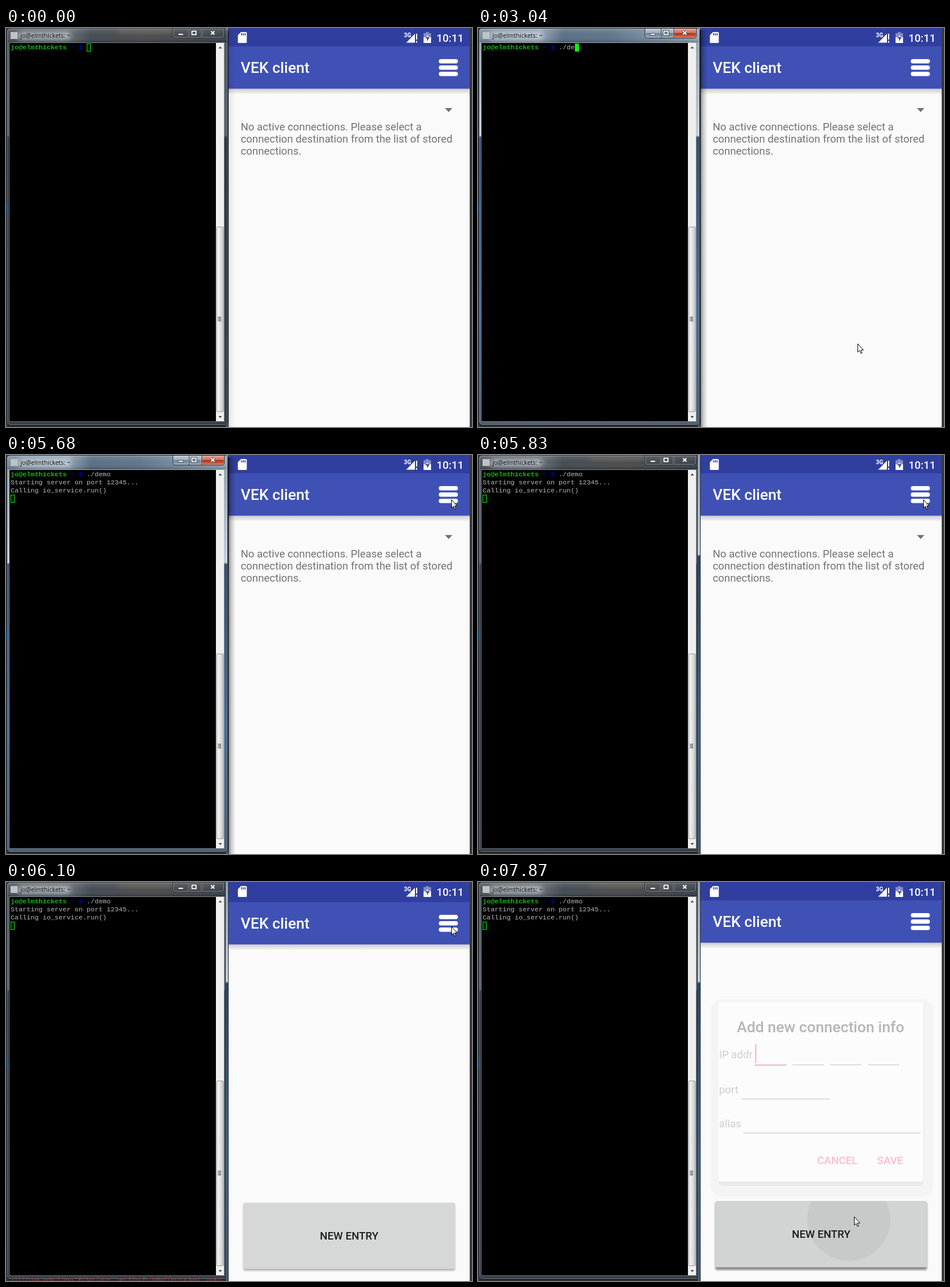
Write an HTML page that moves like this. It is 808x693 px and loops after 7.99 s.

```html
<!DOCTYPE html>
<html lang="en">
<head>
<meta charset="utf-8">
<title>Terminal and phone</title>
<style>
html, body { margin: 0; width: 100%; height: 100%; overflow: hidden; background: #2b2c2e; }
svg { display: block; }
text { white-space: pre; }
.ui { font: 18.35px Roboto, sans-serif; }
.med { font-weight: 500; font-size: 18.5px; }
.head { font-size: 26.2px; }
.mono { font: 11.57px "Liberation Mono", monospace; }
</style>
</head>
<body>
<svg id="stage" width="808" height="693" viewBox="0 0 808 693">
<defs>
  <linearGradient id="idleTitle">
    <stop offset="0" stop-color="#4a5158"/><stop offset=".3" stop-color="#5b6268"/>
    <stop offset=".38" stop-color="#3f474f"/><stop offset=".65" stop-color="#47484a"/>
    <stop offset="1" stop-color="#384048"/>
  </linearGradient>
  <linearGradient id="liveTitle">
    <stop offset="0" stop-color="#75889c"/><stop offset=".28" stop-color="#8fa0b2"/>
    <stop offset=".38" stop-color="#566b81"/><stop offset=".6" stop-color="#5d7288"/>
    <stop offset="1" stop-color="#94a6b8"/>
  </linearGradient>
  <linearGradient id="gloss" x2="0" y2="1">
    <stop offset="0" stop-color="#fff" stop-opacity=".16"/><stop offset=".5" stop-color="#fff" stop-opacity=".03"/>
    <stop offset="1" stop-color="#000" stop-opacity=".2"/>
  </linearGradient>
  <linearGradient id="liveSide" x2="0" y2="1">
    <stop offset="0" stop-color="#8e9dac"/><stop offset=".27" stop-color="#c9d3dc"/>
    <stop offset=".275" stop-color="#2c4764"/><stop offset=".7" stop-color="#42668c"/>
    <stop offset="1" stop-color="#465a6c"/>
  </linearGradient>
  <linearGradient id="idleSide" x2="0" y2="1">
    <stop offset="0" stop-color="#4c545c"/><stop offset=".27" stop-color="#525b64"/>
    <stop offset=".275" stop-color="#252d36"/><stop offset="1" stop-color="#30383f"/>
  </linearGradient>
  <linearGradient id="silver" x2="0" y2="1">
    <stop offset="0" stop-color="#c4cfda"/><stop offset=".5" stop-color="#98a8b9"/>
    <stop offset=".52" stop-color="#6c7f94"/><stop offset="1" stop-color="#93a8bd"/>
  </linearGradient>
  <linearGradient id="red" x2="0" y2="1">
    <stop offset="0" stop-color="#e5aaa0"/><stop offset=".48" stop-color="#cc6a58"/>
    <stop offset=".52" stop-color="#b02a16"/><stop offset="1" stop-color="#d97a52"/>
  </linearGradient>
  <linearGradient id="thumb">
    <stop offset="0" stop-color="#f6f6f6"/><stop offset=".5" stop-color="#e3e3e4"/>
    <stop offset="1" stop-color="#c2c3c6"/>
  </linearGradient>
  <linearGradient id="cast">
    <stop offset="0" stop-color="#000" stop-opacity=".55"/><stop offset=".4" stop-color="#000" stop-opacity=".2"/>
    <stop offset="1" stop-color="#000" stop-opacity="0"/>
  </linearGradient>
  <linearGradient id="drop" x2="0" y2="1">
    <stop offset="0" stop-color="#000" stop-opacity=".18"/><stop offset="1" stop-color="#000" stop-opacity=".04"/>
  </linearGradient>
  <filter id="blur" x="-20%" y="-80%" width="140%" height="260%"><feGaussianBlur stdDeviation="4"/></filter>
  <filter id="soft" x="-5%" y="-10%" width="110%" height="125%"><feGaussianBlur stdDeviation="1.5"/></filter>
  <clipPath id="btnClip"><rect x="412" y="554" width="366" height="115" rx="2"/></clipPath>
  <g id="bar">
    <rect x="386" width="418" height="32" fill="#303f9f"/>
    <rect x="386" y="32" width="418" height="73.500" fill="#3f51b5"/>
    <rect x="386" y="105.500" width="418" height="8.500" fill="url(#drop)"/>
    <text class="ui med head" x="407" y="78" fill="#fff">VEK client</text>
    <g fill="#fff">
      <rect x="750.500" y="54" width="33" height="7.500" rx="3.500"/>
      <rect x="750.500" y="65" width="33" height="7.500" rx="3.500"/>
      <rect x="750.500" y="76" width="33" height="7.500" rx="3.500"/>
    </g>
  </g>
</defs>

<rect width="808" height="693" fill="#2b2c2e"/>
<rect width="2" height="693" fill="#36414c"/>
<rect y="304" width="2" height="18" fill="#0d5c94"/>
<rect x="804" width="4" height="693" fill="#37383a"/>

<g id="phone">
  <g id="phoneEdge">
    <rect x="380" y="-20" width="6" height="713" fill="url(#liveSide)"/>
    <path d="M380.5 0V693M385.5 0V693" stroke="#252c34"/>
  </g>
  <g id="home">
    <rect x="386" width="418" height="693" fill="#fafafa"/>
    <use href="#bar"/>
    <path d="M761 139h13l-6.5 7z" fill="#737373"/>
    <g class="ui" fill="#737373">
      <text x="407" y="178">No active connections. Please select a</text>
      <text x="407" y="199">connection destination from the list of stored</text>
      <text x="407" y="220">connections.</text>
    </g>
  </g>
  <g id="menu">
    <rect x="386" width="418" height="700" fill="#fafafa"/>
    <use href="#bar"/>
    <rect id="btnShade" x="411.5" y="556" width="367" height="116" rx="3" filter="url(#soft)"/>
    <rect x="412" y="554" width="366" height="115" rx="2" fill="#d6d7d7"/>
    <g id="ripple" clip-path="url(#btnClip)">
      <rect x="412" y="554" width="366" height="115" fill="#d2d4d3"/>
      <circle cx="643" cy="586" r="72" fill="#c8c9c9"/>
    </g>
    <text class="ui med" x="595" y="618" text-anchor="middle" fill="#1c1c1c">NEW ENTRY</text>
  </g>
  <g id="dialog">
    <rect x="404" y="204" width="385" height="342" rx="18" fill="#f4f4f4"/>
    <rect x="417" y="212" width="356" height="316" rx="8" fill="#eaeaea"/>
    <rect x="417" y="209" width="355" height="311" rx="3" fill="#fcfcfc"/>
    <text class="ui med head" x="594" y="261" text-anchor="middle" fill="#b6b6b6">Add new connection info</text>
    <g class="ui" fill="#cecece">
      <text x="418" y="306">IP addr</text><text x="418" y="367">port</text><text x="418" y="426">alias</text>
    </g>
    <path d="M545 317.5h55M611 317.5h54M676 317.5h54M457 376.7h153M460 436h307" stroke="#d2d2d2" stroke-width="1.5"/>
    <path d="M480 318h55M481.5 282v33" stroke="#f9b9d0" stroke-width="2.4"/>
    <g class="ui med" fill="#f9bdd2"><text x="588" y="490">CANCEL</text><text x="692" y="490">SAVE</text></g>
  </g>
  <g fill="#fff">
    <path d="M407.500 7h8.500q1.500 0 1.500 1.500v16q0 1.500 -1.500 1.500h-12.500q-1.500 0 -1.500 -1.500V12.500z"/>
    <path d="M408.500 9v4M411.500 9v4M414.500 9v4" stroke="#303f9f" stroke-width="1.600"/>
    <text x="690" y="15.500" style="font:700 10px Roboto,sans-serif">3G</text>
    <path d="M694 25.500L709 10v15.500z"/>
    <path d="M712 10v10M712 22.500v3" stroke="#fff" stroke-width="2"/>
    <path d="M728 7h5v2h4v8h-13V9h4z" opacity=".4"/>
    <path d="M724 16h13v10h-13z"/>
    <path d="M731.500 11l-4.500 7h3v5l4.500 -7h-3z" fill="#303f9f"/>
    <path d="M731.500 11l-3 5h6l.3 -.5h-3.300z"/>
    <text class="ui med" x="746.500" y="23.500">10:11</text>
  </g>
</g>

<g id="term">
  <rect id="cast1" x="385" y="4" width="13" height="689" fill="url(#cast)"/>
  <g id="idle">
    <rect x="1.500" y=".5" width="383" height="689" rx="6" fill="url(#idleSide)" stroke="#15191d"/>
    <path d="M2 25V6q0 -5 5 -5H379q5 0 5 5V25z" fill="url(#idleTitle)"/>
    <rect x="195" y="4" width="92" height="5" fill="#8d7d5d" opacity=".45" filter="url(#blur)"/>
  </g>
  <g id="live">
    <rect x="1.500" y=".5" width="383" height="689" rx="6" fill="url(#liveSide)" stroke="#15191d"/>
    <path d="M2 25V6q0 -5 5 -5H379q5 0 5 5V25z" fill="url(#liveTitle)"/>
  </g>
  <path d="M2 25V6q0 -5 5 -5H379q5 0 5 5V25z" fill="url(#gloss)"/>
  <rect x="2.500" y="1.500" width="381" height="687" rx="5" fill="none" stroke="#c5d2dd" stroke-opacity=".5"/>
  <rect x="5.500" y="25.500" width="373.500" height="658.500" fill="none" stroke="#a9b5bf" stroke-opacity=".55"/>
  <rect x="20" y="7" width="92" height="13" rx="6" fill="#d8dfe6" opacity=".7" filter="url(#blur)"/>
  <rect x="8" y="7" width="12" height="12" fill="#bfc3c4"/>
  <text x="25" y="17" fill="#0a0a0a" style="font:10.600px 'Open Sans',sans-serif">jo@elmthickets: ~</text>

  <g id="liveBtns">
    <path d="M290 1h50v16H294q-4 0 -4 -4z" fill="url(#silver)"/>
    <path d="M340 1h38v12q0 4 -4 4H340z" fill="url(#red)"/>
  </g>
  <path d="M289.500 1v12q0 4.500 4.500 4.500H374q4.500 0 4.500 -4.500V1M317.500 1v16M339.500 1v16" fill="none" stroke="#2a3138"/>
  <path d="M290.500 1v11q0 4.500 4 4.500H316.500V1M318.500 1v15.500H338.500V1M340.500 1v15.500H373q4.500 0 4.500 -4.500V1" fill="none" stroke="#e2e9ef" stroke-opacity=".35"/>
  <rect x="298.500" y="9.500" width="9" height="3" fill="#fff" stroke="#454d57"/>
  <rect x="322.500" y="5.500" width="7" height="6" fill="none" stroke="#394149" stroke-width="4"/>
  <rect x="322.500" y="5.500" width="7" height="6" fill="none" stroke="#fff" stroke-width="2"/>
  <path d="M355.500 5.500l6 6M361.500 5.500l-6 6" stroke="#454d57" stroke-width="4"/>
  <path d="M355.500 5.500l6 6M361.500 5.500l-6 6" stroke="#fff" stroke-width="2"/>

  <rect x="6" y="26" width="358" height="657" fill="#000"/>
  <rect x="364" y="26" width="14" height="657" fill="#efefef"/>
  <rect x="365.500" y="345.500" width="11.500" height="321" rx="1.500" fill="url(#thumb)" stroke="#95979a"/>
  <path d="M367.500 502.500h5.500M367.500 505.500h5.500M367.500 508.500h5.500" stroke="#4e5358" stroke-width="1.500"/>
  <path d="M368.500 35.500l3 -3.500 3 3.500zM368.500 674h6l-3 3.500z" fill="#444"/>

  <g class="mono" fill="#bbb">
    <text x="8" y="37" font-weight="700" fill="#00c400">jo@elmthickets <tspan fill="#0000c0">~ $</tspan></text>
    <text id="typed" y="37"></text>
    <g id="output">
      <text x="8" y="51">Starting server on port 12345...</text>
      <text x="8" y="65">Calling io_service.run()</text>
    </g>
  </g>
  <rect id="caret" width="6" height="13" stroke="#00ff00"/>
  <text id="log" class="mono" x="8" y="694" fill="#b23a36" style="font-size:10.300px">illl/com.vekclient E/Surface: getSlotFromBufferLocked: unkn</text>
</g>

<use id="edgeTop" href="#phoneEdge"/>
<path id="arrow" d="M.5 .5V15L3.700 12 6 17.300 8 16.400 5.900 11.300H10.200z" fill="#fff" stroke="#000"/>
<path id="beam" d="M0 .5h2.500l1 1 1 -1H7M3.500 1v13M0 14.500h2.500l1 -1 1 1H7" fill="none" stroke="#ddd"/>
</svg>
<script>
const LOOP = 7990, CELL = 6.94, LEFT = 8, PROMPT = 19;
const el = {};
document.querySelectorAll("[id]").forEach(n => el[n.id] = n);

// [time, shape, x, y]
const POINTER = [
  [0, "", 0, 0], [520, "arrow", 607, 587], [650, "beam", 376, 404], [800, "beam", 308, 359],
  [940, "beam", 290, 352], [1210, "arrow", 658, 548], [4440, "arrow", 754, 312],
  [4590, "arrow", 756, 254], [4740, "arrow", 794, 98], [4880, "arrow", 784, 86],
  [5000, "arrow", 776, 79], [5130, "arrow", 772, 77], [6770, "arrow", 767, 84],
  [6920, "arrow", 694, 372], [7040, "arrow", 652, 581]
];
// [time, letters typed]
const TYPING = [[0, 0], [2180, 2], [3040, 4], [3200, 5], [3340, 6]];
// [time, opacity, offset] of the menu page
const SLIDE = [[0, 0, 0], [5960, 0.6, 22], [6100, 1, 3], [6220, 1, 0]];
// [time, opacity] of the focused window look
const FOCUS = [[0, 0], [940, 0.6], [1060, 1], [5830, 0]];

const at = (steps, t) => steps.filter(s => s[0] <= t).pop();
const show = (node, on) => node.setAttribute("visibility", on ? "visible" : "hidden");
const set = (node, attrs) => { for (const k in attrs) node.setAttribute(k, attrs[k]); };

function draw(t) {
  const [, shape, x, y] = at(POINTER, t);
  for (const name of ["arrow", "beam"]) {
    show(el[name], name === shape);
    set(el[name], { transform: `translate(${x} ${y})` });
  }

  const focus = at(FOCUS, t)[1], phoneFront = t >= 5830;
  set(el.live, { opacity: focus });
  set(el.liveBtns, { opacity: focus });
  set(el.cast1, { opacity: 0.25 + 0.75 * focus });
  show(el.cast1, !phoneFront);
  show(el.edgeTop, phoneFront);

  const count = at(TYPING, t)[1], running = t >= 3600;
  const solid = t >= 940 && t < 5680;
  el.typed.textContent = "./demo".slice(0, count);
  set(el.typed, { x: LEFT + PROMPT * CELL });
  show(el.output, running);
  const col = running ? 0 : PROMPT + count;
  set(el.caret, {
    x: Math.round(LEFT + col * CELL) + 0.5,
    y: running ? 69.5 : 27.5,
    fill: solid ? "#00ff00" : "none"
  });

  const [, alpha, dy] = at(SLIDE, t);
  set(el.menu, { opacity: alpha, transform: `translate(0 ${dy})` });
  show(el.log, t >= 6100 && t < 6220);
  set(el.btnShade, { opacity: t >= 7730 ? 0.42 : 0.28, height: t >= 7730 ? 118 : 116 });
  show(el.ripple, t >= 7870);
  show(el.dialog, t >= 7870);
}

const start = performance.now();
function tick() {
  draw((performance.now() - start) % LOOP);
  requestAnimationFrame(tick);
}
tick();
</script>
</body>
</html>
```
